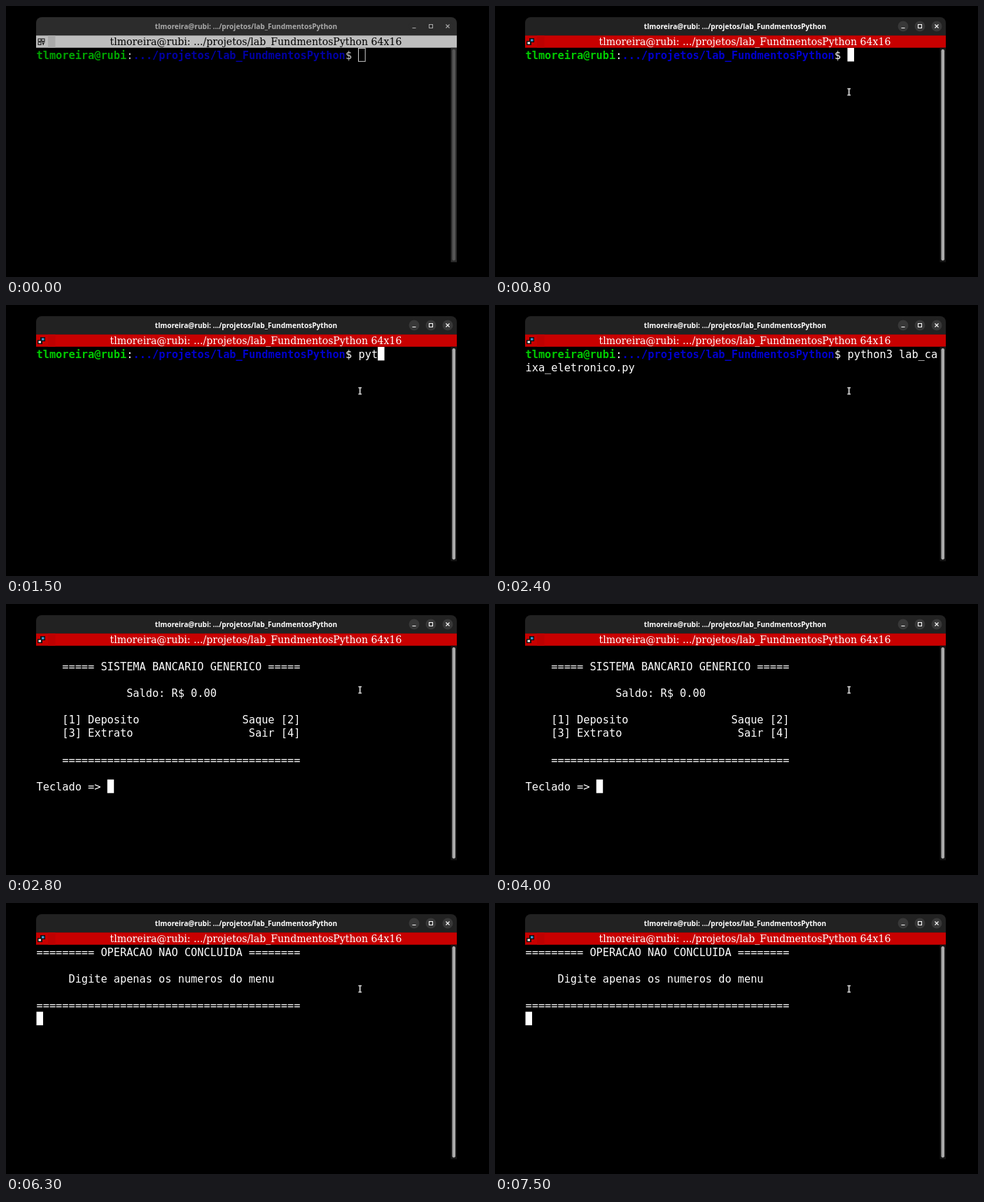
An HTML page with a canvas that plays this animation: 690 px wide and 388 px high, repeating every 8000 ms.

```html
<!DOCTYPE html>
<html lang="pt">
<head>
<meta charset="utf-8">
<title>Terminal</title>
<style>
html, body { margin: 0; height: 100%; overflow: hidden; background: #000; }
canvas { display: block; width: 690px; height: 388px; }
</style>
</head>
<body>
<canvas id="stage" width="690" height="388"></canvas>
<script>
const ctx = document.getElementById('stage').getContext('2d');
const LOOP = 8000, FOCUS = 500;
const LEFT = 43.5, TOP = 60.3, CELL = 9.2, ROW = 19.13;
const MONO = '15.28px "DejaVu Sans Mono", monospace';
const USER = 'tlmoreira@rubi', PATH = '.../projetos/lab_FundmentosPython';
const TITLE = `${USER}: ${PATH}`;
const COMMAND = 'python3 lab_caixa_eletronico.py';

const MENU = [
  '',
  '    ===== SISTEMA BANCARIO GENERICO =====',
  '',
  '              Saldo: R$ 0.00',
  '',
  '    [1] Deposito                Saque [2]',
  '    [3] Extrato                  Sair [4]',
  '',
  '    ' + '='.repeat(37),
  '',
  'Teclado => '
];
const ERROR = [
  '========= OPERACAO NAO CONCLUIDA ========',
  '',
  '     Digite apenas os numeros do menu',
  '',
  '='.repeat(41)
];

function rect(color, x, y, w, h, r = 0) {
  ctx.fillStyle = color;
  ctx.beginPath();
  ctx.roundRect(x, y, w, h, r);
  ctx.fill();
}

function line(color, width, ...points) {
  ctx.strokeStyle = color;
  ctx.lineWidth = width;
  ctx.beginPath();
  for (const [x1, y1, x2, y2] of points) {
    ctx.moveTo(x1, y1);
    ctx.lineTo(x2, y2);
  }
  ctx.stroke();
}

function frameRect(color, x, y, w, h) {
  ctx.strokeStyle = color;
  ctx.lineWidth = 1;
  ctx.strokeRect(x, y, w, h);
}

function text(str, x, y, color, font, align = 'left') {
  ctx.font = font;
  ctx.textAlign = align;
  ctx.fillStyle = color;
  ctx.fillText(str, x, y);
}

const print = (str, col, row, color = '#fff', weight = '') =>
  text(str, LEFT + col * CELL, TOP + row * ROW + 15.2, color, weight + MONO);

function cursor(col, row, filled = true) {
  const x = LEFT + col * CELL, y = TOP + row * ROW;
  if (filled) rect('#fff', x, y - 0.3, CELL + 0.3, ROW + 0.3);
  else frameRect('#ccc', x, y + 0.2, CELL + 0.5, ROW - 0.3);
}

const grey = v => `rgb(${v},${v},${v})`;

function header(focus) {
  const mix = (a, b) => grey(Math.round(a + (b - a) * focus));
  rect(mix(44, 34), 43, 16, 601, 26.5, [8, 8, 0, 0]);
  text(TITLE, 343, 32.6, mix(170, 255), 'bold 10.1px "Noto Sans", sans-serif', 'center');
  for (const x of [583, 607, 631]) {
    rect(mix(44, 56), x - 7.5, 21.5, 15, 15, 7.5);
  }
  const glyph = mix(170, 255);
  line(glyph, 1, [580.5, 31.5, 585.5, 31.5]);
  frameRect(glyph, 604.5, 26.5, 5, 5);
  line(glyph, 1.1, [628.5, 26.5, 633.5, 31.5], [633.5, 26.5, 628.5, 31.5]);
}

function titleBar(active) {
  rect(active ? '#c80000' : '#bebebe', 43, 42.3, 601, 17.4);
  rect(active ? '#be0000' : '#aaa', 60, 42.3, 10.5, 17.4);
  if (active) {
    rect('#111', 49, 46, 7, 6);
    rect('#111', 45, 50, 7, 6);
    rect('#3aa0e0', 51, 47.5, 3.5, 3);
    rect('#eee', 46.5, 51.5, 3.5, 3);
  } else {
    for (const [x, y] of [[46, 47], [51, 47], [46, 52]]) frameRect('#111', x, y, 4, 3.5);
    line('#111', 1.2, [51, 52, 55.5, 52], [52, 53.5, 54.5, 53.5], [53.2, 53, 53.2, 56]);
  }
  text(TITLE + ' 64x16', 357, 56, active ? '#fff' : '#000',
    '14.1px "DejaVu Serif", serif', 'center');
}

function scrollbar(focus) {
  rect(grey(Math.round(45 - 23 * focus)), 635.5, 59.7, 8.5, 307);
  rect(grey(Math.round(85 + 85 * focus)), 637.5, 62, 4.5, 302.5, 2.2);
}

function pointer() {
  const beam = [[503.5, 118.5, 508, 118.5], [505.7, 118.5, 505.7, 127.5], [503.5, 127.5, 508, 127.5]];
  line('#555', 2.6, ...beam);
  line('#ddd', 1.2, ...beam);
}

function prompt(t) {
  const active = t >= FOCUS;
  print(USER, 0, 0, active ? '#00cc00' : '#00a300', 'bold ');
  print(':', 14, 0, active ? '#fff' : '#ccc');
  print(PATH, 15, 0, active ? '#0000cc' : '#0000a3', 'bold ');
  print('$', 48, 0, active ? '#fff' : '#ccc');

  const typed = t < 1400 ? '' : t < 1500 ? 'p' : t < 1800 ? 'pyt' : COMMAND;
  print(typed.slice(0, 14), 50, 0);
  print(typed.slice(14), 0, 1);
  if (t < 1800) cursor(50 + typed.length, 0, active);
  else if (t < 2400) cursor(18, 1);
}

function menu(t) {
  MENU.forEach((str, row) => print(str, 0, row));
  if (t >= 5600) {
    print('p', 11, 10);
    cursor(12, 10);
  } else if (t < 3300 || (t >= 4000 && t < 4500) || t >= 5200) {
    cursor(11, 10);
  }
}

function error(t) {
  ERROR.forEach((str, row) => print(str, 0, row));
  if (t < 6900 || t >= 7500) cursor(0, 5);
}

function draw(t) {
  const focus = Math.min(1, Math.max(0, (t - FOCUS + 100) / 200)) * (t >= FOCUS);
  rect('#000', 0, 0, 690, 388);
  header(focus);
  titleBar(t >= FOCUS);
  scrollbar(focus);
  (t < 2800 ? prompt : t < 6200 ? menu : error)(t);
  if (t >= FOCUS) pointer();
}

const start = performance.now();
function tick() {
  draw((performance.now() - start) % LOOP);
  requestAnimationFrame(tick);
}
tick();
</script>
</body>
</html>
```
